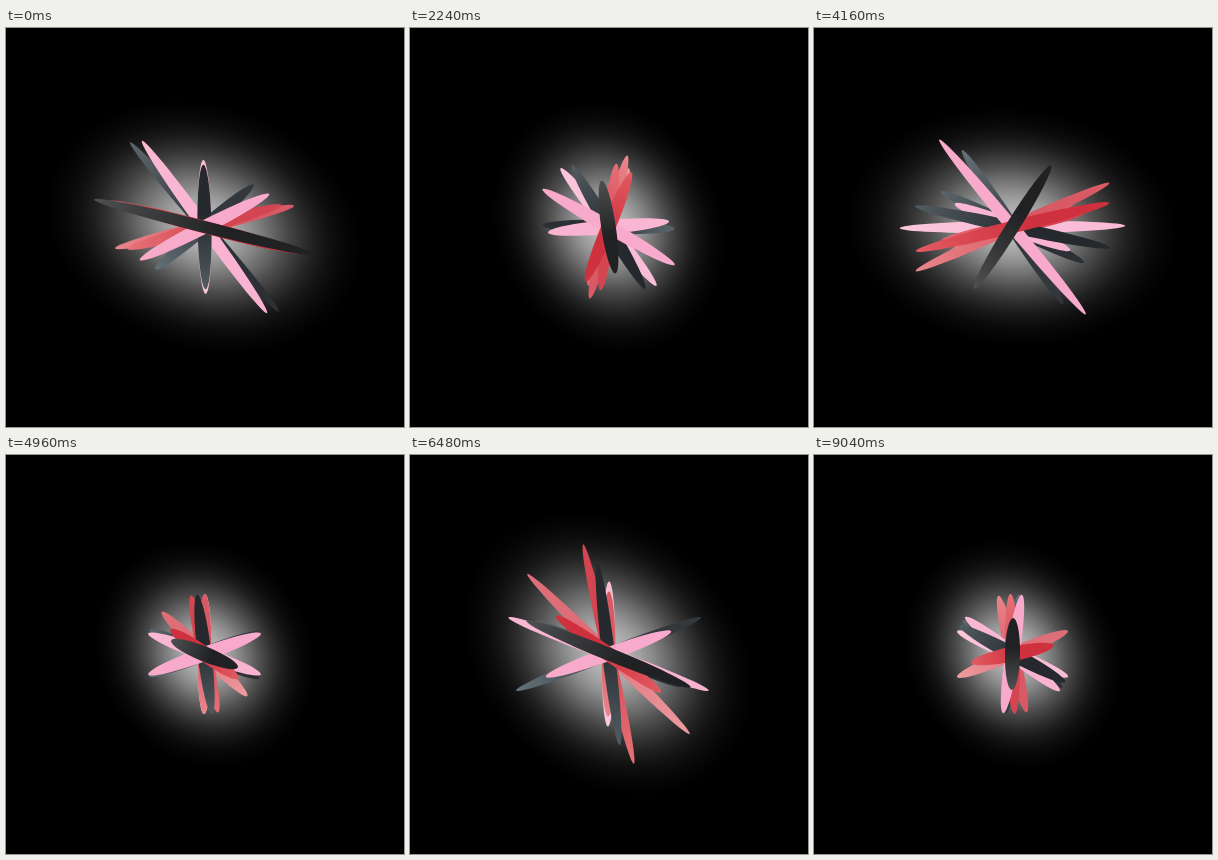
An HTML page with a canvas for the animation above (9120 ms loop, 398 by 399 pixels).

```html
<!DOCTYPE html>
<html lang="en">
<head>
<meta charset="utf-8">
<title>Pulsing petals</title>
<style>
  html, body { margin: 0; width: 100%; height: 100%; overflow: hidden; background: #000; }
  canvas { display: block; }
</style>
</head>
<body>
<canvas id="stage" width="398" height="399"></canvas>
<script>
const ctx = document.getElementById('stage').getContext('2d');
const W = 398, H = 399, CX = 198.5, CY = 199;
const LOOP = 9120, STEP = 80, SWING = 120;
const COUNT = 11, MAIN = 6;

const ease = p => p * p * (3 - 2 * p);
const mix = (a, b, p) => a + (b - a) * p;
const clamp = v => Math.max(0, Math.min(1, v));
const ramp = (a, b, v) => ease(clamp((v - a) / (b - a)));
const noise = n => {
  const v = Math.sin(n * 12.9898) * 43758.5453;
  return v - Math.floor(v);
};

// One opening and closing of the star. dirs: angles of the front petals;
// phase: which petals grow longest.
const SCENES = [
  { start: -1300, phase: 0, dirs: [14, 15, -27, -91, -16, 54] },
  { start: 840, phase: 0, dirs: [58, -2, -71, 60, 31, 19] },
  { start: 1960, phase: 2, dirs: Array.from({ length: MAIN }, (_, i) => noise(i + 5) * 180) },
  { start: 3360, phase: 2, dirs: [-58, -14, 50, 12, -11, 22] },
  { start: 4820, phase: 4.3, dirs: [22, 216, -20, -97, 257, 20] },
  { start: 7040, phase: 0, dirs: [-91, -75, 40, 36, -12, -26] },
  { start: 8640, phase: 0, dirs: [-89, -12, 99, 28, 88, 38] }
];
// The loop cuts the last scene off while it is still closed.
const LAST_END = 12600;

// Rear petals mirror the order of the front ones, slightly fanned out.
function angleOf(scene, i) {
  if (i < MAIN) return scene.dirs[i];
  return scene.dirs[COUNT - i] + (noise(i + scene.start) - 0.5) * 28;
}

function sizeOf(scene, i, open) {
  const closed = 36 + 24 * Math.min(1, i / 2) ** 2;
  const full = 88 + 26 * Math.cos(1.1 * (i - scene.phase));
  return mix(closed, full, open);
}

function pose(t) {
  let k = SCENES.length - 1;
  while (SCENES[k].start > t) k--;
  const scene = SCENES[k], prev = SCENES[k - 1] || scene;
  const end = k + 1 < SCENES.length ? SCENES[k + 1].start : LAST_END;
  const u = (t - scene.start) / (end - scene.start);
  const open = ramp(0.12, 0.34, u) - ramp(0.8, 0.97, u);
  const left = 1 - ramp(0, SWING, t - scene.start);
  return Array.from({ length: COUNT }, (_, i) => {
    const angle = angleOf(scene, i);
    const d = angle - angleOf(prev, i);
    const turn = d - 180 * Math.round(d / 180);
    return {
      angle: (angle - turn * left) * Math.PI / 180,
      size: sizeOf(scene, i, open)
    };
  });
}

// Dark, red and pink take turns and get lighter towards the back.
function colors(i) {
  const depth = Math.floor(i / 3);
  return [
    [`hsl(200 ${depth ? 9 : 2}% ${31 + depth * 4}%)`, `hsl(210 ${depth ? 9 : 3}% ${13 + depth * 3}%)`],
    [`hsl(357 70% ${62 + depth * 5}%)`, `hsl(355 62% ${50 + depth * 5}%)`],
    [`hsl(336 85% ${82 + depth * 3}%)`, `hsl(334 85% ${82 + depth * 2}%)`]
  ][i % 3];
}

function oval(angle, rx, ry, fill) {
  ctx.save();
  ctx.translate(CX, CY);
  ctx.rotate(angle);
  ctx.scale(rx, ry);
  ctx.fillStyle = fill;
  ctx.beginPath();
  ctx.arc(0, 0, 1, 0, Math.PI * 2);
  ctx.fill();
  ctx.restore();
}

const halo = ctx.createRadialGradient(0, 0, 0, 0, 0, 1);
for (let i = 0; i <= 16; i++) {
  const r = i / 16;
  halo.addColorStop(r, `rgba(255,255,255,${0.74 * Math.exp(-3.2 * r * r) * (1 - r ** 4)})`);
}

// The glow stretches along the main direction of all petals.
function drawHalo(list) {
  let m = 0, c = 0, s = 0;
  for (const { angle, size } of list) {
    const w = size * size / COUNT;
    m += w;
    c += w * Math.cos(2 * angle);
    s += w * Math.sin(2 * angle);
  }
  const pull = Math.hypot(c, s);
  oval(Math.atan2(s, c) / 2, 56 + Math.sqrt(m + pull), 56 + Math.sqrt(m - pull), halo);
}

const fills = Array.from({ length: COUNT }, (_, i) => {
  const fill = ctx.createLinearGradient(-1, 0, 1, 0);
  const [from, to] = colors(i);
  fill.addColorStop(0, from);
  fill.addColorStop(0.6, to);
  return fill;
});

function frame() {
  const t = Math.floor(performance.now() % LOOP / STEP) * STEP;
  const list = pose(t);
  ctx.fillStyle = '#000';
  ctx.fillRect(0, 0, W, H);
  drawHalo(list);
  for (let i = COUNT - 1; i >= 0; i--) {
    const { angle, size } = list[i];
    oval(angle, size, 8.2 - size * 0.019, fills[i]);
  }
  requestAnimationFrame(frame);
}
frame();
</script>
</body>
</html>
```
